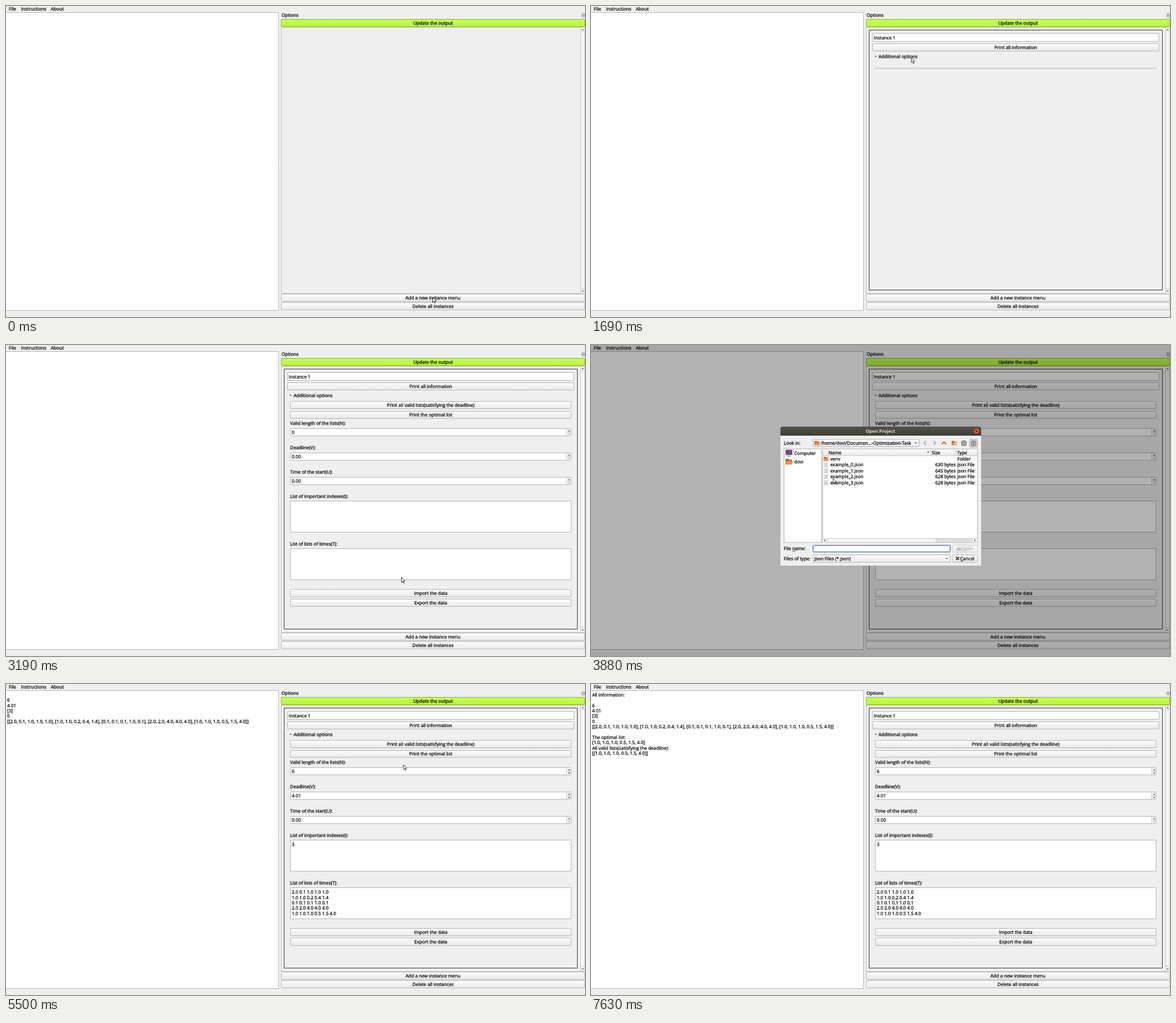
Write an HTML page with a canvas that moves like this. It is 1021 px wide and 549 px high and loops after 8 s.

```html
<!DOCTYPE html>
<html lang="en">
<head>
<meta charset="utf-8">
<title>Instance editor</title>
<style>
html, body { margin: 0; width: 100%; height: 100%; overflow: hidden; background: #efefef; }
canvas { display: block; }
</style>
</head>
<body>
<canvas id="stage" width="1021" height="549"></canvas>
<script>
const c = document.getElementById('stage').getContext('2d');
const LOOP = 8000, PITCH = 9.38;
const EDGE = '#b4b4b4', INK = '#000';
c.textRendering = 'geometricPrecision';

// A hairline around the glyphs gives the sturdier weight of the interface font
function text(s, x, cy, { align = 'left', color = INK, bold = false, size = 8.08 } = {}) {
  c.font = (bold ? 'bold ' : '') + size + 'px "Open Sans", "Noto Sans", sans-serif';
  c.textAlign = align;
  c.fillStyle = c.strokeStyle = color;
  c.lineWidth = .28;
  c.lineJoin = 'round';
  c.fillText(s, x, cy + 2.8);
  if (!bold) c.strokeText(s, x, cy + 2.8);
}

function lines(list, x, cy) {
  list.forEach((s, i) => text(s, x, cy + i * PITCH, { size: 8 }));
}

function rect(x, y, w, h, color) {
  c.fillStyle = color;
  c.fillRect(x, y, w, h);
}

// Outlined box from corner to corner, with crisp one pixel edges
function box(x0, y0, x1, y1, fill, stroke = EDGE, r = 0) {
  c.beginPath();
  c.roundRect(x0 + .5, y0 + .5, x1 - x0 - 1, y1 - y0 - 1, r);
  c.fillStyle = fill;
  c.fill();
  c.strokeStyle = stroke;
  c.lineWidth = 1;
  c.stroke();
}

function shade(y0, y1, top, bottom) {
  const g = c.createLinearGradient(0, y0, 0, y1);
  g.addColorStop(0, top);
  g.addColorStop(1, bottom);
  return g;
}

function poly(points, fill, stroke, width = 1) {
  c.beginPath();
  points.forEach(([x, y]) => c.lineTo(x, y));
  if (fill) { c.closePath(); c.fillStyle = fill; c.fill(); }
  if (stroke) { c.strokeStyle = stroke; c.lineWidth = width; c.stroke(); }
}

function button(x0, y0, x1, y1, label, top = '#fefefe', bottom = '#e8e8e8', edge = EDGE) {
  box(x0, y0, x1, y1, shade(y0, y1, top, bottom), edge, 1.5);
  text(label, (x0 + x1) / 2, (y0 + y1) / 2, { align: 'center' });
}

// Small triangle; turn 0 points right, 1 down, 2 left, 3 up
function arrow(x, y, turn, size = 2, color = '#333') {
  c.save();
  c.translate(x, y);
  c.rotate(turn * Math.PI / 2);
  poly([[-size / 2, -size], [size / 2, 0], [-size / 2, size]], color);
  c.restore();
}

function spin(cy, value) {
  box(501, cy - 7, 997, cy + 7, '#fff', EDGE, 1.5);
  rect(989, cy - 6, 7, 12, '#f3f3f3');
  rect(988, cy - 6, 1, 12, '#d0d0d0');
  rect(989, cy, 7, 1, '#d0d0d0');
  arrow(993, cy - 2.5, 3, 2);
  arrow(993, cy + 3.5, 1, 2, value > 0 ? '#333' : '#aaa');
  text(value, 504, cy);
}

function pointer(x, y) {
  c.save();
  c.translate(x, y);
  c.lineJoin = 'round';
  poly([[.5, .5], [.5, 9], [2.4, 7.3], [3.9, 10.5], [5.2, 9.9], [3.8, 6.8], [6.6, 6.6], [.5, .5]],
    '#fff', '#222', .9);
  c.restore();
}

function folder(x, y, w, h) {
  rect(x, y, w * .5, h * .4, '#c4511c');
  rect(x, y + h * .15, w, h * .85, '#d9601f');
  rect(x + 1, y + h * .4, w - 1, h * .6, '#f2944d');
}

const ROWS = ['2.0 0.1 1.0 1.0 1.0', '1.0 1.0 0.2 0.4 1.4', '0.1 0.1 0.1 1.0 0.1',
  '2.0 2.0 4.0 4.0 4.0', '1.0 1.0 1.0 0.5 1.5 4.0'];
const bracket = row => '[' + row.split(' ').join(', ') + ']';
const BEST = bracket(ROWS[4]);
const DATA = ['', '6', '4.01', '[3]', '0', '[' + ROWS.map(bracket).join(', ') + ']'];
const REPORT = ['All information:', ...DATA, '', 'The optimal list:', BEST,
  'All valid lists(satisfying the deadline):', '[' + BEST + ']'];

function frame(t) {
  rect(0, 0, 1021, 549, '#efefef');
  text('File', 5, 5);
  text('Instructions', 26.5, 5);
  text('About', 79, 5);
  box(-1, 11, 481, 538, '#fff');
  text('Options', 486, 16.5);
  box(1015, 13, 1021, 20, '#f4f4f4', '#888', 1);
  poly([[1016.5, 18], [1019.5, 15]], null, '#555', .8);
  poly([[1016.5, 15], [1019.5, 18]], null, '#555', .8);
  button(485, 23, 1021, 37, 'Update the output', '#c8ff5c', '#b5fa35', '#86b52c');
  box(485, 37, 1021, 508, '#efefef', '#c2c2c2');
  box(1013, 37, 1021, 508, '#f7f7f7', '#c8c8c8');
  rect(1014, 45, 6, 1, '#c8c8c8');
  rect(1014, 498, 6, 1, '#c8c8c8');
  arrow(1017, 41.5, 3, 2);
  arrow(1017, 503.5, 1, 2);
  const pressed = t >= 440 && t < 508;
  button(485, 508, 1021, 522, 'Add a new instance menu', ...(pressed ? ['#d8d8d8', '#dedede'] : []));
  button(485, 523, 1021, 537, 'Delete all instances');
}

function panel(t) {
  box(490, 42, 1008, 502, '#efefef', '#333');
  box(496, 48, 1002, 63, '#fff', EDGE, 1.5);
  text('Instance 1', 498.5, 56);
  button(496, 66, 1002, 80, 'Print all information');
  arrow(502, 89, t < 1690 ? 0 : 1);
  text('Additional options', 507, 89.5);
  if (t < 1690) return;
  if (t < 2380) {
    rect(501, 109, 496, 5, '#f8f8f8');
    rect(501, 109, 496, 1, '#c4c4c4');
    rect(501, 111, 496, 1, '#c4c4c4');
    rect(501, 109, 1, 4, '#c4c4c4');
    rect(996, 109, 1, 4, '#c4c4c4');
    return;
  }
  const loaded = t >= 5500;
  button(501, 99, 997, 113, 'Print all valid lists(satisfying the deadline)');
  button(501, 117, 997, 130, 'Print the optimal list');
  text('Valid length of the lists(N):', 501, 138.5);
  spin(154, loaded ? '6' : '0');
  text('Deadline(V):', 501, 181.5);
  spin(197, loaded ? '4.01' : '0.00');
  text('Time of the start(U):', 501, 224.5);
  spin(240, '0.00');
  text('List of important indexes(I):', 501, 267.5);
  box(501, 275, 997, 331, '#fff');
  text('List of lists of times(T):', 501, 351.5);
  box(501, 359, 997, 415, '#fff');
  if (loaded) {
    text('3', 504, 283.5);
    lines(ROWS, 504, 367.5);
  }
  button(501, 431, 997, 445, 'Import the data');
  button(501, 448, 997, 462, 'Export the data');
}

function dialog(t) {
  const picked = t >= 4310, down = t >= 4940;
  rect(0, 0, 1021, 549, 'rgba(0,0,0,.3)');
  rect(334, 158, 354, 231.5, '#efefef');
  c.beginPath();
  c.roundRect(334, 144, 354, 16, [4, 4, 0, 0]);
  c.fillStyle = shade(144, 160, '#55534b', '#3c3b37');
  c.fill();
  text('Open Project', 510.5, 152, { align: 'center', color: '#dfdbd2', bold: true });
  c.beginPath();
  c.arc(680, 152, 4.6, 0, 7);
  c.fillStyle = '#e6592b';
  c.fill();
  poly([[678.3, 150.3], [681.7, 153.7]], null, '#54260f', 1.1);
  poly([[681.7, 150.3], [678.3, 153.7]], null, '#54260f', 1.1);

  // Path row and its tool icons
  text('Look in:', 340, 173.5);
  box(391, 166, 579, 180, shade(166, 180, '#fefefe', '#e8e8e8'), EDGE, 1.5);
  folder(394, 169.5, 9, 7.5);
  text('/home/dovi/Documen...-Optimization-Task', 405, 173.5);
  arrow(572.5, 173, 1);
  poly([[591, 169.5], [587, 173], [591, 176.5]], null, '#b0b0b0', 1.8);
  poly([[604, 169.5], [608, 173], [604, 176.5]], null, '#b0b0b0', 1.8);
  poly([[618.5, 175], [622.5, 171], [626.5, 175]], null, '#e0662a', 2);
  folder(636, 169.5, 9, 7.5);
  rect(641, 172, 3, 3, '#fff0d8');
  box(667, 166, 682, 181, '#d9d9d9', '#aaa', 1.5);
  box(653, 169, 662, 178, '#fff', '#333', 1);
  for (const x of [655, 658]) for (const y of [171, 174]) rect(x, y, 2, 2, '#333');
  box(670, 169, 679, 178, '#fff', '#333', 1);
  for (const y of [171, 173, 175]) rect(672, y, 5, 1, '#333');

  // Places
  box(340, 183, 407, 349, '#fff');
  box(343, 185, 355, 194, '#7c4a80', '#5b3a5e', 1);
  rect(345, 195, 8, 2, '#aaa');
  text('Computer', 358.5, 191.5);
  folder(343, 201, 12, 10);
  text('dovi', 358.5, 206);

  // File list
  box(408, 183, 682, 349, '#fff');
  rect(409, 184, 272, 11, shade(184, 195, '#fcfcfc', '#e9e9e9'));
  rect(409, 195, 272, 1, '#c8c8c8');
  rect(599, 184, 1, 11, '#c8c8c8');
  rect(643, 184, 1, 11, '#c8c8c8');
  text('Name', 419, 190);
  arrow(594.5, 189.5, 1);
  text('Size', 601, 190);
  text('Type', 645.5, 190);
  folder(410.5, 197.5, 8, 7);
  text('venv', 422, 201);
  text('Folder', 646, 201);
  [630, 645, 628, 628].forEach((size, i) => {
    const y = 211.5 + i * 10.5, on = picked && i === 2, color = on ? '#fff' : INK;
    if (on) rect(408, 227, 273, 10.5, '#308cc6');
    rect(411, y - 4, 7, 8, on ? '#7cb0d2' : '#c4c4c4');
    rect(412, y - 3, 5, 6, on ? '#a6cbe2' : '#ececec');
    for (let k = -2; k < 3; k += 2) rect(413, y + k, 3, .7, '#aaa');
    text('example_' + i + '.json', 422, y, { color });
    text(size + ' bytes', 643, y, { color, align: 'right' });
    text('json File', 646, y, { color });
  });
  box(408, 341, 682, 349, '#dedede', '#c4c4c4');
  rect(409, 342, 200, 6, '#f7f7f7');
  rect(673, 342, 8, 6, '#f7f7f7');
  rect(417, 342, 1, 6, '#c4c4c4');
  rect(608, 342, 1, 6, '#c4c4c4');
  arrow(412, 345, 2, 2);
  arrow(677, 345, 0, 2);

  // Name, type and the two buttons
  text('File name:', 340, 359.5);
  rect(355.5, 363.5, 4.5, .8, INK);
  box(391, 353, 634, 366, '#fff', picked ? EDGE : '#3a7ca8', 1.5);
  if (!picked) box(392, 354, 633, 365, '#fff', '#b9d3e4', 1);
  if (picked) text('example_2.json', 393, 359.5);
  text('Files of type:', 340, 377);
  box(391, 370, 634, 384, shade(370, 384, '#fefefe', '#e8e8e8'), EDGE, 1.5);
  text('Json Files (*.json)', 394, 377);
  arrow(627.5, 377, 1);
  const ink = picked ? INK : '#b5b5b5';
  button(637, 353, 682, 366, '', ...(down ? ['#c3c8cc', '#ced3d6', '#5d8298']
    : picked ? ['#fefefe', '#e8e8e8', '#7297ad'] : ['#f4f4f4', '#ececec', '#cfcfcf']));
  poly([[644, 363], [646, 358], [653, 358], [652, 363]], picked ? '#777' : '#c0c0c0');
  rect(645, 356.5, 5, 2, picked ? '#999' : '#cfcfcf');
  text('Open', 653, 359.5, { color: ink });
  rect(653.5, 363.5, 5.5, .8, ink);
  button(637, 370, 682, 384, '');
  poly([[643.5, 374], [649, 379.5]], null, '#444', 2);
  poly([[649, 374], [643.5, 379.5]], null, '#444', 2);
  text('Cancel', 651, 377);
  rect(651.5, 381, 4.5, .8, INK);
}

// Pointer stops: from the given time on, at x, y
const STOPS = [[0, 752, 514], [1250, 568, 93], [1310, 564.5, 91], [2380, 694, 351], [2750, 720, 430],
  [3190, 697, 410], [3880, 426.5, 235], [4940, 658.5, 353], [5500, 700.5, 142], [6000, 762, 73], [7190, 304.5, 4]];

function pointerAt(t) {
  if (t >= 508 && t < 1250) {
    const p = Math.min(1, Math.floor((t - 440) / 68) / 11), e = p * p * (3 - 2 * p);
    return [752 - 177 * e, 514 - 418 * e];
  }
  return STOPS.findLast(s => s[0] <= t).slice(1);
}

function draw(now) {
  const t = now % LOOP;
  frame(t);
  if (t >= 508) panel(t);
  if (t >= 5500) lines(t < 6440 ? DATA : REPORT, 2, 19);
  if (t >= 3880 && t < 5500) dialog(t);
  if (t < 7630) pointer(...pointerAt(t));
}

const start = performance.now();
function tick() {
  draw(performance.now() - start);
  requestAnimationFrame(tick);
}
tick();
</script>
</body>
</html>
```
